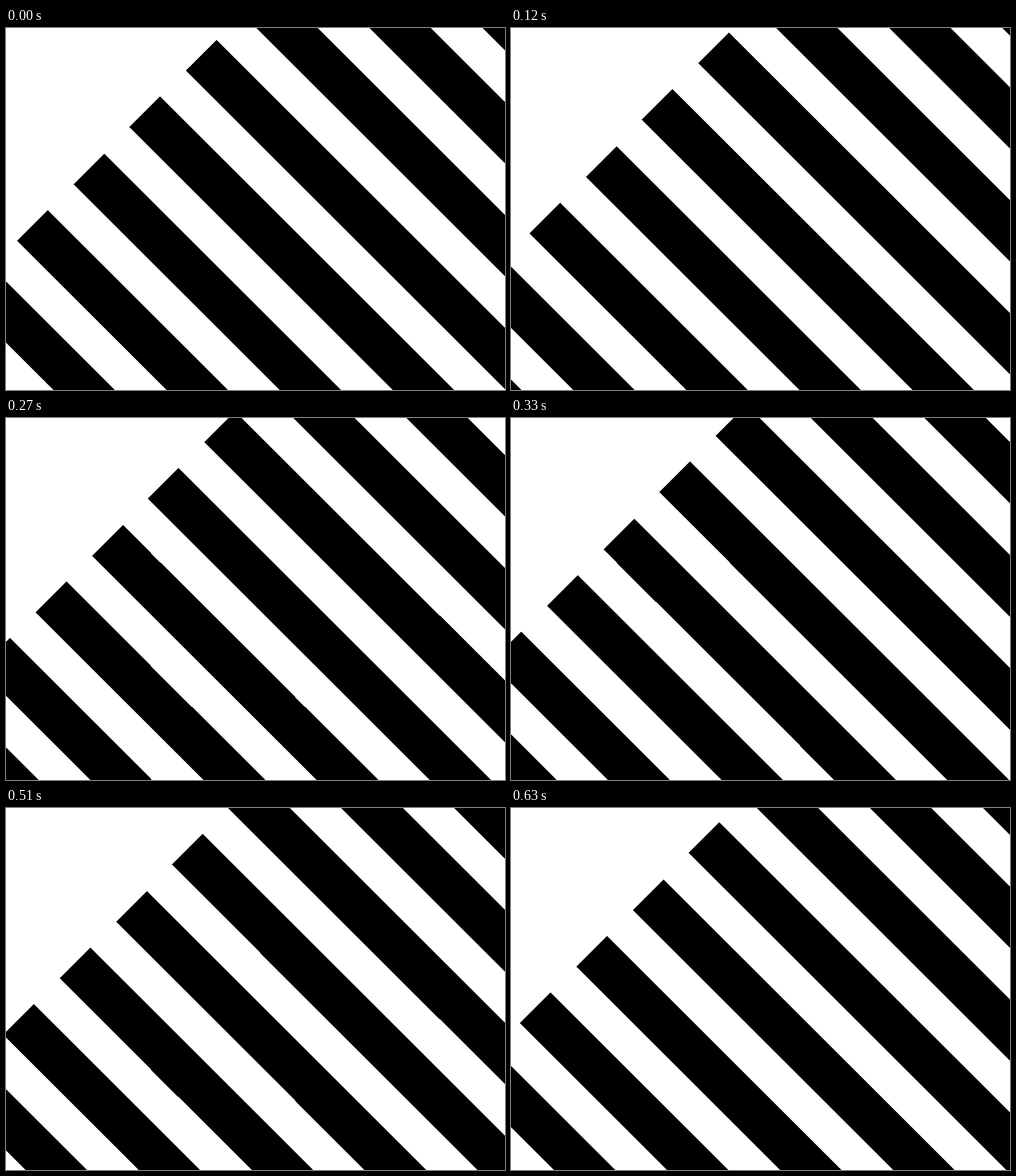
An HTML page for the animation above (0.66 s loop, 878 by 638 pixels).

```html
<!DOCTYPE html>
<html lang="en">
<head>
<meta charset="utf-8">
<title>Sliding stripes</title>
<style>
  html, body { margin: 0; width: 100%; height: 100%; overflow: hidden; background: #fff; }
  svg { display: block; }
</style>
</head>
<body>
<svg width="878" height="638" viewBox="0 0 878 638" shape-rendering="crispEdges">
  <path id="bars"/>
</svg>
<script>
const LOOP = 660, STEP = 30;
const PITCH = 99.5;  // diagonal offset between neighbouring bars
const HALF = 54.1;   // extent of a bar's end cap in x and y
const LENGTH = 1200;

// Time (ms) and distance travelled up and to the right (px)
const travel = [
  [0, 0], [120, 12.9], [210, 21.6], [330, 43.8],
  [420, 61.9], [510, 74.8], [630, 95.4], [LOOP, PITCH]
];

const bars = document.getElementById('bars');

function barPath(i) {
  const diff = 349.6 - 2 * PITCH * i;  // x - y along the upper edge
  const sum = i < 2 ? 392 : 394.4;     // x + y along the end cap
  const x = (sum + diff) / 2, y = (sum - diff) / 2;
  return `M${x} ${y}l${-HALF} ${HALF}l${LENGTH} ${LENGTH}l${HALF} ${-HALF}z`;
}

function distance(t) {
  const k = travel.findIndex(([time]) => time > t);
  const [t0, d0] = travel[k - 1], [t1, d1] = travel[k];
  return d0 + (d1 - d0) * (t - t0) / (t1 - t0);
}

function draw() {
  const t = Math.floor(performance.now() % LOOP / STEP) * STEP;
  const d = distance(t);
  bars.setAttribute('transform', `translate(${d} ${-d})`);
  requestAnimationFrame(draw);
}

bars.setAttribute('d', Array.from({ length: 11 }, (_, n) => barPath(n - 3)).join(''));
draw();
</script>
</body>
</html>
```
